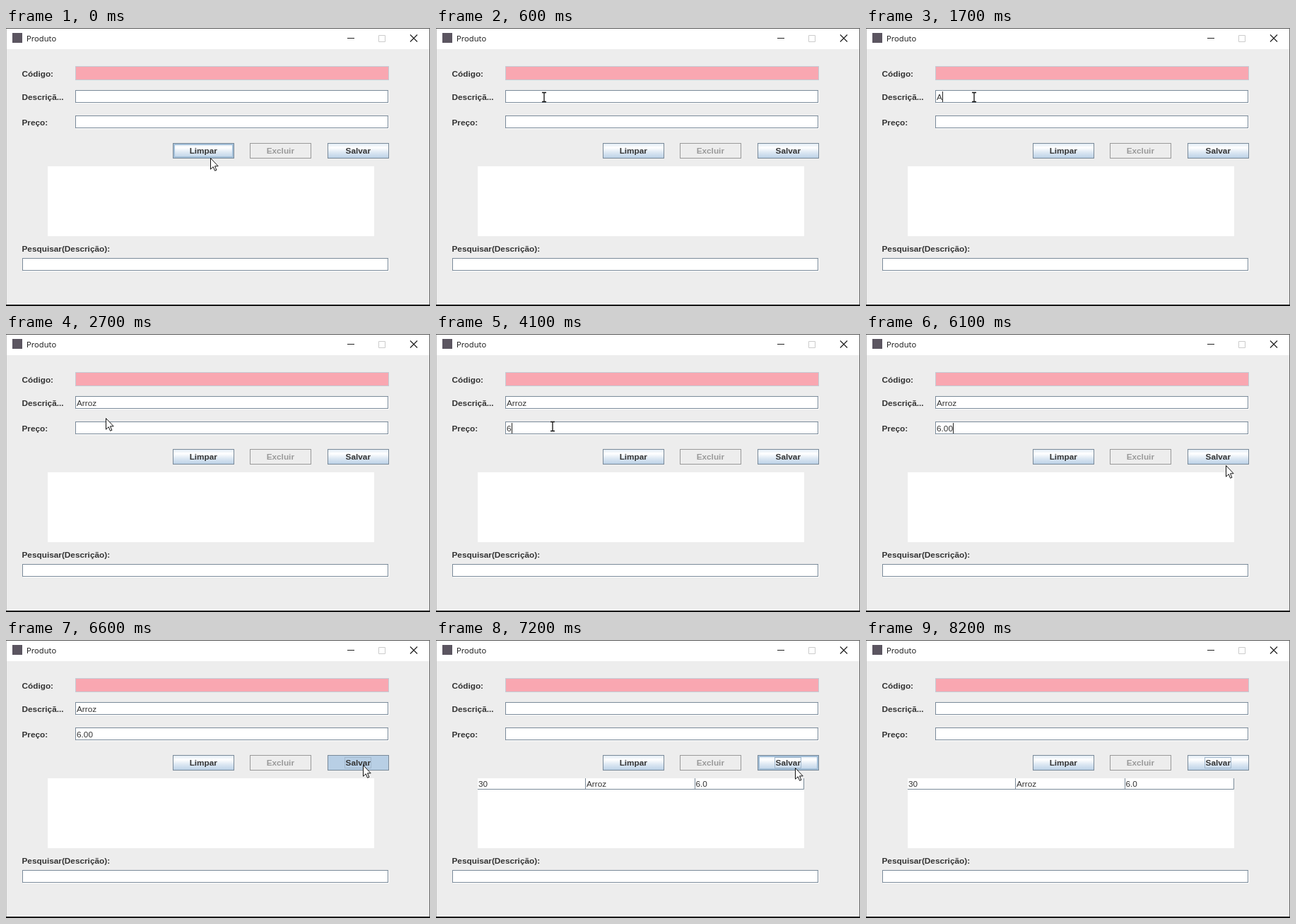
Recreate the animation shown at these times as an HTML page. Size 600 by 394 pixels, loop 8400 ms.

```html
<!DOCTYPE html>
<html lang="pt">
<head>
<meta charset="utf-8">
<title>Produto</title>
<style>
  html, body { margin: 0; width: 100%; height: 100%; overflow: hidden; background: #ededed; }
  svg { display: block; width: 100vw; height: 100vh; }
  text { font: 11.8px "Liberation Sans", Arial, sans-serif; fill: #333; white-space: pre; }
  .label { font-weight: bold; }
  .title { font: 11.2px "Open Sans", sans-serif; fill: #111; }
  .off { fill: #999; }
  .mid { text-anchor: middle; }
  .edge { fill: none; stroke: #7a8a99; }
  .hover { fill: none; stroke: #a3bfd8; stroke-width: 2; }
  .focus { fill: none; stroke: #a3b8cc; }
  .caret { stroke: #222; }
</style>
</head>
<body>
<svg id="stage" viewBox="0 0 600 394">
  <defs>
    <linearGradient id="ocean" x2="0" y2="1">
      <stop offset="0" stop-color="#dde8f3"/>
      <stop offset=".3" stop-color="#fff"/>
      <stop offset=".6" stop-color="#dde8f3"/>
      <stop offset="1" stop-color="#b8cfe5"/>
    </linearGradient>
  </defs>

  <!-- window frame -->
  <rect width="600" height="394" fill="#ededed"/>
  <rect width="600" height="30" fill="#fff"/>
  <rect width="600" height="1" fill="#555"/>
  <rect y="1" width="1" height="391" fill="#c4c4c4"/>
  <rect x="599" width="1" height="394" fill="#666"/>
  <rect y="392" width="600" height="2" fill="#181818"/>
  <rect x="9" y="7" width="14" height="14" fill="#5b5560"/>
  <text class="title" x="29" y="19">Produto</text>
  <g fill="none" stroke="#222">
    <path d="M483 14.5h10"/>
    <path d="M527.5 10.5h9v9h-9z" stroke="#ccc"/>
    <path d="M572 9.5l10 10M582 9.5l-10 10" stroke-width="1.2"/>
  </g>

  <!-- form -->
  <text class="label" x="22.5" y="69">Código:</text>
  <text class="label" x="22.5" y="102">Descriçã...</text>
  <text class="label" x="22.5" y="138">Preço:</text>
  <text class="label" x="22.5" y="317">Pesquisar(Descrição):</text>
  <rect x="98.5" y="54.5" width="443" height="19" fill="#f9a7b1" stroke="#c3ccd5"/>
  <g id="fields"></g>
  <g id="buttons"></g>

  <!-- table -->
  <rect x="59" y="196" width="462" height="99" fill="#fff"/>
  <g id="row">
    <path class="edge" d="M59 211.5H520.5V196M211.5 196v15M366.5 196v15"/>
    <text x="60" y="208">30</text>
    <text x="213" y="208">Arroz</text>
    <text x="367.5" y="208">6.0</text>
  </g>

  <!-- pointers -->
  <path id="arrow" d="M.5 .5V16.2L4.2 12.7L6.6 18.3L8.9 17.3L6.5 11.8H11.2Z" fill="#fff" stroke="#111"/>
  <path id="beam" d="M-3 -6.5h2.5L0 -6L.5 -6.5H3M0 -6V6M-3 6.5h2.5L0 6L.5 6.5H3" fill="none" stroke="#111" stroke-width="1.3"/>
</svg>
<script>
const LOOP = 8400, TICK = 100, BLINK = 500;
const $ = id => document.getElementById(id);

function add(parent, tag, attrs, text = '') {
  const el = document.createElementNS('http://www.w3.org/2000/svg', tag);
  for (const key in attrs) el.setAttribute(key, attrs[key]);
  el.textContent = text;
  parent.append(el);
  return el;
}

const show = (el, on) => el.setAttribute('visibility', on ? 'visible' : 'hidden');
const inside = (b, x, y) => x >= b.x && x <= b.x + b.w && y >= b.y && y <= b.y + b.h;

function makeField(x, y, w, h) {
  const g = $('fields');
  add(g, 'rect', { x: x + 1, y: y + 1, width: w, height: h, fill: '#fff' });
  add(g, 'rect', { x: x + .5, y: y + .5, width: w - 1, height: h - 1, fill: '#fff', class: 'edge', style: 'fill:#fff' });
  const text = add(g, 'text', { x: x + 2, y: y + 14 });
  const caret = add(g, 'path', { class: 'caret' });
  return { x, y, w, h, text, caret };
}

function makeButton(x, name, enabled = true) {
  const g = $('buttons'), y = 163, w = 87, h = 22;
  const face = add(g, 'rect', { x, y, width: w, height: h, fill: enabled ? 'url(#ocean)' : '#ededed' });
  const hover = add(g, 'rect', { x: x + 2, y: y + 2, width: w - 4, height: h - 4, class: 'hover' });
  add(g, 'rect', { x: x + .5, y: y + .5, width: w - 1, height: h - 1, class: 'edge', style: enabled ? '' : 'stroke:#999' });
  const focus = add(g, 'rect', { x: x + 24.5, y: y + 3.5, width: 37, height: 15, class: 'focus' });
  add(g, 'text', { x: x + 43.3, y: y + 15, class: 'label mid' + (enabled ? '' : ' off') }, name);
  show(focus, false);
  show(hover, false);
  return { x, y, w, h, face, hover, focus };
}

const desc = makeField(98, 88, 443, 18);
const price = makeField(98, 124, 443, 18);
makeField(23, 326, 518, 18);
const clear = makeButton(236, 'Limpar');
makeButton(345, 'Excluir', false);
const save = makeButton(455, 'Salvar');

// Focus span and key times; the caret blink restarts on every key.
Object.assign(desc, { value: 'Arroz', keys: [1700, 1800, 1900, 2000, 2200], from: 800, to: 3300 });
Object.assign(price, { value: '6.00', keys: [4000, 4500, 4900, 5100], from: 3300, to: 6500 });
const PRESS = 6500, SAVED = 6700, GONE = 8200;

const path = [
  [0, 289, 184], [300, 206, 129], [600, 153, 98], [2600, 153, 98], [2700, 141, 119],
  [3000, 165, 131], [5400, 165, 131], [5500, 516, 203], [5700, 516, 203],
  [6300, 505, 177], [6900, 505, 177], [7200, 508, 181], [7900, 508, 181], [8100, 514, 150], [LOOP, 514, 150]
];

function pointer(t) {
  const i = path.findIndex(p => p[0] > t);
  const [t0, x0, y0] = path[i - 1], [t1, x1, y1] = path[i];
  const k = (t - t0) / (t1 - t0);
  return [Math.round(x0 + (x1 - x0) * k), Math.round(y0 + (y1 - y0) * k)];
}

function drawField(f, t) {
  const typed = f.keys.filter(k => k <= t);
  f.text.textContent = t < SAVED ? f.value.slice(0, typed.length) : '';
  const last = typed.length ? typed[typed.length - 1] : f.from;
  const lit = Math.floor((t - last) / BLINK) % 2 === 0;
  const x = f.x + 2 + Math.round(f.text.getComputedTextLength()) + .5;
  f.caret.setAttribute('d', `M${x} ${f.y + 2}v15`);
  show(f.caret, t >= f.from && t < f.to && lit);
}

function draw(t) {
  const [x, y] = pointer(t), live = t < GONE;
  const pressed = t >= PRESS && t < SAVED;
  drawField(desc, t);
  drawField(price, t);
  for (const b of [clear, save]) show(b.hover, live && !(b === save && pressed) && inside(b, x, y));
  save.face.setAttribute('fill', pressed ? '#b8cfe5' : 'url(#ocean)');
  show(save.focus, t >= PRESS);
  show($('row'), t >= SAVED);

  const typing = inside(desc, x, y) || inside(price, x, y);
  show($('arrow'), live && !typing);
  show($('beam'), live && typing);
  for (const id of ['arrow', 'beam']) $(id).setAttribute('transform', `translate(${x} ${y})`);
}

const start = performance.now();
function frame() {
  const t = (performance.now() - start) % LOOP;
  draw(Math.floor(t / TICK) * TICK);
  requestAnimationFrame(frame);
}
frame();
</script>
</body>
</html>
```
